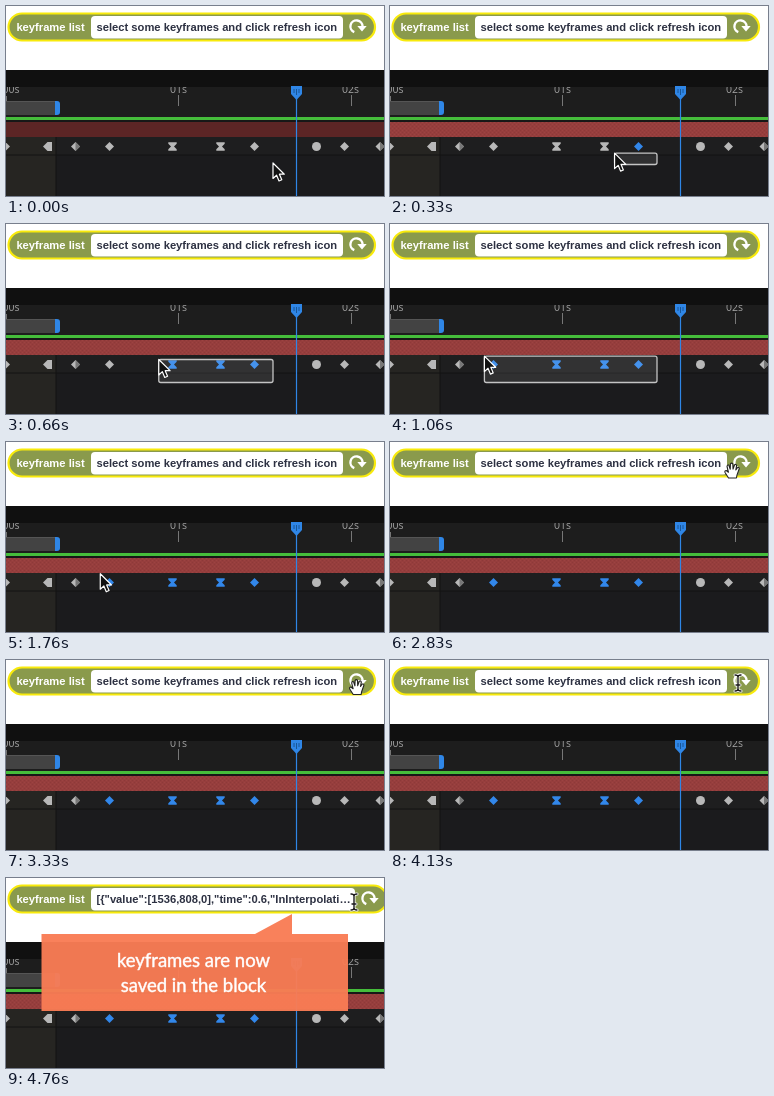
An HTML page for the animation above (8.4 s loop, 378 by 190 pixels).

```html
<!DOCTYPE html>
<html lang="en">
<head>
<meta charset="utf-8">
<title>Keyframe list</title>
<style>
  html, body { margin: 0; width: 100%; height: 100%; overflow: hidden; background: #fff; }
  svg { display: block; width: 378px; height: 190px; }
  .label { font: bold 11.2px "Liberation Sans", Arial, sans-serif; }
  .time { font: 10.5px "Open Sans", sans-serif; fill: #a0a0a0; text-anchor: middle; }
  .note { font: 18.5px Lato, sans-serif; fill: #fff; stroke: #fff; stroke-width: .45px; text-anchor: middle; }
  .key { fill: #b8b8b8; }
  .key.on { fill: #3287ea; }
  .cursor { stroke-linejoin: round; }
</style>
</head>
<body>
<svg viewBox="0 0 378 190">
  <defs>
    <pattern id="grain" width="4" height="4" patternUnits="userSpaceOnUse">
      <path d="M0 0h1v1h-1zM2 2h1v1h-1z" fill="#b35351" opacity=".25"/>
      <path d="M2 0h1v1h-1zM0 2h1v1h-1z" fill="#782c2c" opacity=".25"/>
    </pattern>
    <path id="diamond" d="M0-4.5L4.5 0L0 4.5L-4.5 0Z"/>
    <path id="glass" d="M-4.2-4.2H4.2V-2.8L1.5 0L4.2 2.8V4.2H-4.2V2.8L-1.5 0L-4.2-2.8Z"/>
    <path id="house" d="M4.5-4.5H0L-4.5 0L0 4.5H4.5Z"/>
    <circle id="dot" r="4.5"/>
    <path id="caret" d="M-3-8Q0-8 0-6Q0-8 3-8M0-6V6M-3 8Q0 8 0 6Q0 8 3 8M-2 2H2"/>
  </defs>

  <rect width="378" height="190" fill="#fff"/>

  <!-- block -->
  <rect id="pill" x="2.5" y="7.5" width="366.5" height="27" rx="13.5" fill="#8a9a4c" stroke="#f8ea0c" stroke-width="2.2"/>
  <text class="label" x="10.4" y="25" fill="#fff">keyframe list</text>
  <rect id="field" x="85" y="10" width="252" height="22.5" rx="4" fill="#fff"/>
  <text class="label" id="value" x="90.5" y="25" fill="#2d3142"></text>
  <g id="refresh">
    <path d="M-2.2 5.7A6.1 6.1 0 1 1 6.1 0" fill="none" stroke="#fff" stroke-width="2.4"/>
    <path d="M.8-.6H10.2L5.5 5Z" fill="#fff"/>
  </g>

  <!-- timeline panel -->
  <rect y="64" width="378" height="126" fill="#1b1b1d"/>
  <rect y="79" width="378" height="32" fill="#1d1d1d"/>
  <path d="M.5 90V99M172.5 89V100M345.5 89V100" stroke="#777"/>
  <text class="time" x="5" y="87">00s</text>
  <text class="time" x="172.5" y="87">01s</text>
  <text class="time" x="344.5" y="87">02s</text>
  <rect y="64" width="378" height="17" fill="#101010"/>
  <rect y="95" width="49" height="14" fill="#434343"/>
  <path d="M0 95.5H49" stroke="#555"/>
  <path d="M49 95H51Q54 95 54 98V106Q54 109 51 109H49Z" fill="#2f86e6"/>
  <rect y="111" width="378" height="3" fill="#45bd3b"/>
  <rect y="114" width="378" height="2" fill="#171717"/>
  <rect id="bar" y="116" width="378" height="15" fill="#5c2525"/>
  <rect id="texture" y="116" width="378" height="15" fill="url(#grain)"/>
  <rect y="131" width="378" height="18" fill="#1e1e1f"/>
  <rect y="149" width="378" height="41" fill="#1b1b1d"/>
  <rect y="131" width="50" height="59" fill="#262522"/>
  <path d="M0 149H378M50 131V190" stroke="#131313" fill="none"/>
  <g id="keys"></g>
  <path d="M290.5 93V190" stroke="#2f86e6" stroke-width="1.2"/>
  <path d="M285 80H296V88L290.5 94L285 88Z" fill="#2f86e6"/>
  <path d="M288 83V87M290.5 83V89M293 83V87" stroke="#17518f" stroke-width=".9"/>
  <rect id="marquee" rx="2" fill="#fff" fill-opacity=".09" stroke="#c4c4c4" stroke-width="1.3"/>

  <!-- callout -->
  <g id="callout">
    <path d="M35.5 56H249L286 36V56H342V133H35.5Z" fill="#f97c55" opacity=".96"/>
    <text class="note" x="187.5" y="89">keyframes are now</text>
    <text class="note" x="187.5" y="114">saved in the block</text>
  </g>

  <!-- pointers -->
  <g class="cursor" id="arrow">
    <path d="M0 0V15.5L3.6 12.2L6 18L8.8 16.8L6.4 11.2H11.3Z" fill="#111" stroke="#fff" stroke-width="1.2"/>
  </g>
  <g class="cursor" id="resize">
    <path d="M0-8.5L4.5-3.7H1.6V3.7H4.5L0 8.5L-4.5 3.7H-1.6V-3.7H-4.5Z" fill="#111" stroke="#fff" stroke-width="1.3"/>
  </g>
  <g class="cursor" id="hand">
    <path d="M-3.5 7.5L-7 2Q-7.6 0-5.8 0L-3.6 1.7L-5-4Q-4.8-6-3.2-5.4L-1.8-1.2L-1.6-6.6Q-.4-8.2.8-6.6L1-1.4L2.6-5.8Q4.2-6.8 4.6-5L3.8-.6L5.6-3Q7.2-3.4 7.2-1.8L5 4.4L4.4 7.5Z" fill="#fff" stroke="#222" stroke-width="1.1"/>
  </g>
  <g class="cursor" id="beam" fill="none" stroke-linecap="round">
    <use href="#caret" stroke="#fff" stroke-width="3"/>
    <use href="#caret" stroke="#1b1b1b" stroke-width="1.4"/>
  </g>
</svg>
<script>
const LOOP = 8400;
const el = id => document.getElementById(id);
const place = (node, x, y) => node.setAttribute('transform', `translate(${x} ${y})`);
const show = (node, on) => node.setAttribute('visibility', on ? 'visible' : 'hidden');
const set = (node, attrs) => { for (const k in attrs) node.setAttribute(k, attrs[k]); };
function addKeyPart(tag, attrs, x) {
  const node = document.createElementNS('http://www.w3.org/2000/svg', tag);
  set(node, attrs);
  place(node, x, 140.5);
  el('keys').append(node);
  return node;
}

// shape, x, can be selected
const keys = [
  ['diamond', -.5], ['house', 41.5], ['diamond', 69.5], ['diamond', 103.5, true],
  ['glass', 166.5, true], ['glass', 214.5, true], ['diamond', 248.5, true],
  ['dot', 310.5], ['diamond', 338.5], ['diamond', 374]
].map(([shape, x, pick]) =>
  ({ node: addKeyPart('use', { href: '#' + shape, class: 'key' }, x), x, pick }));
// shaded halves of mixed-interpolation keys
for (const x of [69.5, 374]) addKeyPart('path', { d: 'M0-4.5L4.5 0L0 4.5Z', fill: '#777' }, x);

// pointer path: ms, x, y
const path = [
  [0, 267, 157], [30, 267, 157], [200, 247, 152], [660, 153, 135.5],
  [860, 101, 132.6], [1160, 93.5, 132], [1730, 93.5, 132], [1960, 122, 123],
  [2360, 252, 80], [2600, 311, 59], [2830, 342, 28.5], [3430, 351, 27], [LOOP, 351, 27]
];
const slope = (i, k) => (path[i + 1][k] - path[i][k]) / (path[i + 1][0] - path[i][0]);
function tangent(i, k) {
  if (i === 0 || i === path.length - 1) return 0;
  const a = slope(i - 1, k), b = slope(i, k);
  return a * b > 0 ? 2 * a * b / (a + b) : 0;
}
// monotone cubic through the path points
function along(t, k) {
  let i = 0;
  while (i < path.length - 2 && t >= path[i + 1][0]) i++;
  const h = path[i + 1][0] - path[i][0], u = (t - path[i][0]) / h, v = 1 - u;
  return path[i][k] * v * v * (1 + 2 * u) + path[i + 1][k] * u * u * (3 - 2 * u)
    + h * u * v * (v * tangent(i, k) - u * tangent(i + 1, k));
}

function render(t) {
  const x = along(t, 1), y = along(t, 2);
  const saved = t >= 4230, typing = t >= 4130;
  const kind = typing ? 'beam' : y < 64 ? 'hand' : y < 87 ? 'resize' : 'arrow';
  for (const id of ['arrow', 'resize', 'hand', 'beam']) show(el(id), id === kind);
  if (typing) place(el('beam'), 348, saved ? 24 : 23);
  else place(el(kind), x, y);

  const left = Math.min(x, 267);
  show(el('marquee'), t >= 30 && t < 1430);
  set(el('marquee'), { x: left, y: y, width: 267 - left, height: 158.5 - y });
  let any = false;
  for (const key of keys) {
    const on = !!key.pick && (t > 1160 || left < key.x + 4);
    key.node.classList.toggle('on', on);
    any = any || on;
  }
  el('bar').setAttribute('fill', any ? '#963e3d' : '#5c2525');
  show(el('texture'), any);

  el('value').textContent = saved
    ? '[{"value":[1536,808,0],"time":0.6,"InInterpolati…'
    : 'select some keyframes and click refresh icon';
  const grow = saved ? 12 : 0;
  el('field').setAttribute('width', 252 + grow);
  el('pill').setAttribute('width', 366.5 + grow);
  place(el('refresh'), 350.5 + grow, 20.5);
  el('callout').setAttribute('opacity', t < 4530 ? 0 : t < 4560 ? .5 : 1);
}

function tick() {
  render(performance.now() % LOOP);
  requestAnimationFrame(tick);
}
tick();
</script>
</body>
</html>
```
